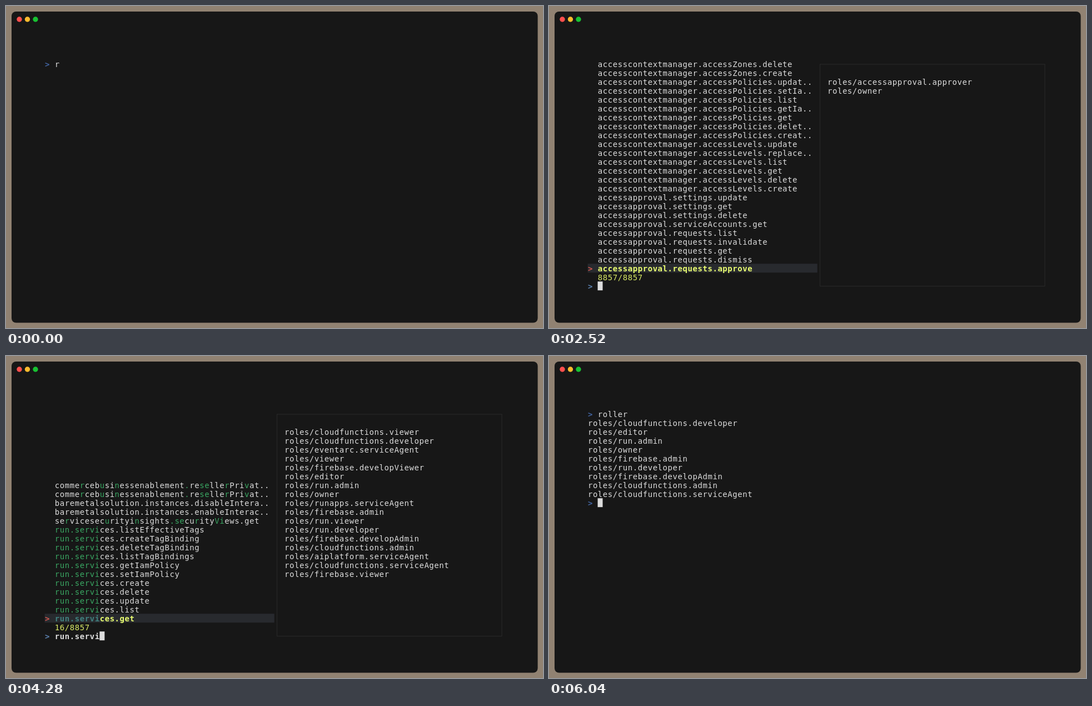
An HTML page with a canvas for the animation above (8000 ms loop, 966 px wide and 580 px high).

```html
<!DOCTYPE html>
<html>
<head>
<meta charset="utf-8">
<style>
  html, body { margin: 0; width: 100%; height: 100%; overflow: hidden; background: #918272; }
  canvas { display: block; }
</style>
</head>
<body>
<canvas id="stage" width="966" height="580"></canvas>
<script>
const ctx = document.getElementById("stage").getContext("2d");
const LOOP = 8000, TICK = 40;
const LEFT = 69.6, TOP = 96.7, COL = 8.98, ROW = 16, ROWS = 24;
const C = {
  frame: "#918272", back: "#171717", text: "#dddddd", border: "#2a2a2a", line: "#282a2e",
  shell: "#41639f", prompt: "#5b80ae", pointer: "#d0574f", match: "#3aa863",
  current: "#ebff71", currentMatch: "#40807f", info: "#d9ea66"
};

const words = (prefix, list) => list.trim().split(/\s+/).map(w => prefix + w);

const allItems = [
  ...words("accesscontextmanager.access", `Zones.delete Zones.create Policies.update
    Policies.setIamPolicy Policies.list Policies.getIamPolicy Policies.get Policies.delete
    Policies.create Levels.update Levels.replaceAll Levels.list Levels.get Levels.delete Levels.create`),
  ...words("accessapproval.", `settings.update settings.get settings.delete serviceAccounts.get
    requests.list requests.invalidate requests.get requests.dismiss requests.approve`)
];
const runItems = words("run", `.locations.list .operations.delete .operations.get .operations.list
  .revisions.delete .revisions.get .revisions.list .routes.invoke .services.create .services.delete
  .services.list .services.update apps.locations.get .jobs.create .jobs.delete .jobs.list .jobs.update
  .routes.get .routes.list .services.get .tasks.get .tasks.list .jobs.get .jobs.run`);
const shortItems = words("run.", `operations.list executions.get locations.list operations.get
  revisions.list services.getIamPolicy services.setIamPolicy revisions.get routes.invoke jobs.create
  jobs.delete jobs.update routes.list routes.get tasks.list services.create services.delete
  services.update jobs.list tasks.get jobs.get jobs.run services.list services.get`);
const serviceItems = [
  ...words("commercebusinessenablement.resellerPrivateOfferPlans.", "publish list"),
  ...words("baremetalsolution.instances.", "disableInteractiveSerialConsole enableInteractiveSerialConsole"),
  "servicesecurityinsights.securityViews.get",
  ...words("run.services.", `listEffectiveTags createTagBinding deleteTagBinding listTagBindings
    getIamPolicy setIamPolicy create delete update list get`)
];
const narrowItems = [...shortItems.filter(s => !serviceItems.includes(s)), ...serviceItems];

const roles = list => words("roles/", list);
const approveRoles = roles("accessapproval.approver owner");
const jobRoles = roles(`cloudfunctions.developer visionai.serviceAgent editor run.admin owner
  firebase.admin run.developer integrations.serviceAgent firebase.developAdmin cloudfunctions.admin
  run.invoker cloudfunctions.serviceAgent`);
const getRoles = roles(`cloudfunctions.viewer cloudfunctions.developer eventarc.serviceAgent viewer
  firebase.developViewer editor run.admin owner runapps.serviceAgent firebase.admin run.viewer
  run.developer firebase.developAdmin cloudfunctions.admin aiplatform.serviceAgent
  cloudfunctions.serviceAgent firebase.viewer`);
const createRoles = roles(`cloudfunctions.developer editor run.admin owner firebase.admin
  run.developer firebase.developAdmin cloudfunctions.admin cloudfunctions.serviceAgent`);

const counts = {
  "": 8857, "r": 7642, "ru": 4126, "run": 1874, "run.": 1238,
  "run.s": 621, "run.se": 347, "run.ser": 128, "run.serv": 31
};

// Greedy fuzzy match: positions of the query letters, or null.
function fuzzy(item, query) {
  const hits = [], low = item.toLowerCase();
  let at = -1;
  for (const ch of query) {
    at = low.indexOf(ch, at + 1);
    if (at < 0) return null;
    hits.push(at);
  }
  return hits;
}

function typed(t, start, text, step) {
  return [...text].filter((_, i) => t >= start + Math.ceil(i * step / TICK) * TICK).join("");
}

function write(text, col, row, color, bold, hits = [], hitColor) {
  ctx.font = (bold ? "bold " : "") + '14px "DejaVu Sans Mono", monospace';
  [...text].forEach((ch, i) => {
    ctx.fillStyle = hits.includes(i) ? hitColor : color;
    ctx.fillText(ch, LEFT + (col + i) * COL + 0.3, TOP + row * ROW + 12.8);
  });
}

function block(col, row, cols, color) {
  ctx.fillStyle = color;
  ctx.fillRect(LEFT + col * COL, TOP + row * ROW - 0.5, cols * COL, ROW);
}

function drawWindow() {
  ctx.fillStyle = C.frame;
  ctx.fillRect(0, 0, 966, 580);
  ctx.fillStyle = C.back;
  ctx.beginPath();
  ctx.roundRect(10, 10, 946.5, 560.5, 8);
  ctx.fill();
  ["#ff4f4d", "#febb2e", "#18c132"].forEach((color, i) => {
    ctx.fillStyle = color;
    ctx.beginPath();
    ctx.arc(24 + i * 14.5, 24, 4.7, 0, 7);
    ctx.fill();
  });
}

function drawShell(row, text, cursor) {
  write(">", 0, row, C.shell, true);
  write(text, 2, row, C.text);
  if (cursor) block(2 + text.length, row, 1, C.text);
}

function poolFor(query) {
  if (!query) return allItems;
  if (query.length < 5) return runItems;
  return query.length === 5 ? shortItems : narrowItems;
}

function previewFor(item) {
  if (item === "run.jobs.run") return jobRoles;
  if (item === "run.services.get") return getRoles;
  return item === "run.services.create" ? createRoles : approveRoles;
}

function drawFinder(query, loading, cursor) {
  ctx.strokeStyle = C.border;
  ctx.lineWidth = 1;
  ctx.strokeRect(487.5, 105, 404.5, 399.7);

  const found = loading ? [] : poolFor(query).filter(item => fuzzy(item, query));
  const shown = found.slice(-ROWS);
  shown.forEach((item, i) => {
    const row = ROWS - shown.length + i, current = row === ROWS - 1;
    const label = item.length > 41 ? item.slice(0, 41) + ".." : item;
    const hits = item.startsWith("bare") ? [] : fuzzy(item, query).filter(n => n < 41);
    if (current) {
      block(0, row, 46, C.line);
      write(">", 0, row, C.pointer, true);
    }
    write(label, 2, row, current ? C.current : C.text, current, hits, current ? C.currentMatch : C.match);
  });
  if (shown.length) previewFor(shown.at(-1)).forEach((role, i) => write(role, 48, 2 + i, C.text));

  write(loading ? "0/0" : (counts[query] ?? found.length) + "/8857", 2, 24, C.info);
  write(">", 0, 25, C.prompt, true);
  write(query, 2, 25, C.text, true);
  if (cursor) block(2 + query.length, 25, 1, C.text);
}

const cursorOff = [[0, 40], [840, 1320], [1960, 2520], [3120, 3320], [5880, 6040]];

function draw(now) {
  const t = now % LOOP;
  const cursor = !cursorOff.some(([from, to]) => t >= from && t < to);
  drawWindow();
  if (t < 1320) {
    drawShell(0, typed(t, 0, "roller", 50), cursor);
  } else if (t < 6040) {
    const query = typed(t, 3320, "run", 50) + typed(t, 4000, ".services", 54) + typed(t, 5000, ".create", 47);
    drawFinder(query, t < 1360, cursor);
  } else {
    drawShell(0, "roller", false);
    createRoles.forEach((role, i) => write(role, 0, 1 + i, C.text));
    drawShell(10, "", cursor);
  }
}

function loop() {
  draw(performance.now());
  requestAnimationFrame(loop);
}
loop();
</script>
</body>
</html>
```
